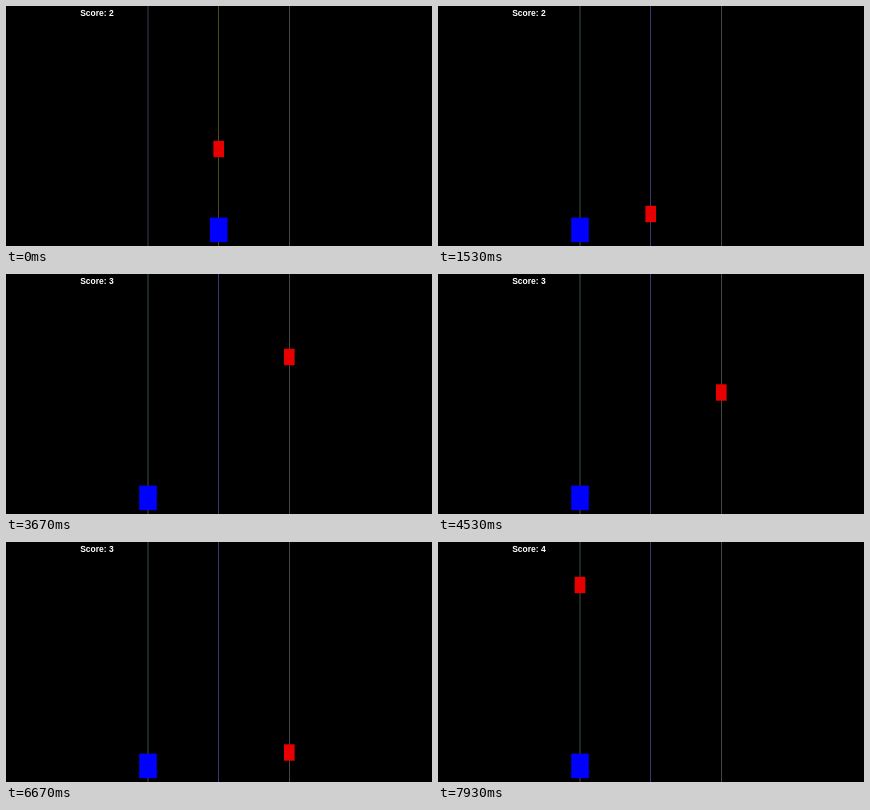
An HTML page for the animation above (8000 ms loop, 426x240 px).

```html
<!DOCTYPE html>
<html lang="en">
<head>
<meta charset="utf-8">
<title>Lane dodge</title>
<style>
  html, body { margin: 0; width: 100%; height: 100%; overflow: hidden; background: #000; }
  svg { display: block; width: 100%; height: 100%; }
  text { font: bold 8.5px "Liberation Sans", Arial, sans-serif; fill: #fff; }
</style>
</head>
<body>
<svg id="stage" viewBox="0 0 426 240">
  <rect width="426" height="240" fill="#000"/>
  <text id="score" x="74.2" y="10"></text>
</svg>
<script>
const LOOP = 8000, FPS = 15;
const LANES = [142, 212.7, 283.3];
const SWITCH = 6; // step at which the player changes lane
const CAR = { w: 17.6, h: 24.6 }, BLOCK = { w: 10.6, h: 16.4 };

// Obstacles: lane and [step, top] waypoints from entry to exit
const obstacles = [
  { lane: 1, path: [[0, 135], [23, 200], [38, 242]] },
  { lane: 2, path: [[25, -8], [42, 39.5], [68, 110.5], [85, 161], [100, 202.5], [114, 242]] },
  { lane: 0, path: [[104, -7], [119, 35]] }
];

const stage = document.getElementById("stage");
const score = document.getElementById("score");

function rect(w, h, fill) {
  const el = document.createElementNS("http://www.w3.org/2000/svg", "rect");
  el.setAttribute("width", w);
  el.setAttribute("height", h);
  el.setAttribute("fill", fill);
  return stage.appendChild(el);
}

function place(el, x, y) {
  el.setAttribute("x", x);
  el.setAttribute("y", y);
}

// The first lane line straddles two pixels, so it is wider and dimmer
const lines = LANES.map((x, i) => {
  const el = rect(i ? 1 : 2, 240, "#444844");
  place(el, i ? Math.floor(x) : x - 1, 0);
  return el;
});
for (const o of obstacles) o.el = rect(BLOCK.w, BLOCK.h, "#e60000");
const player = rect(CAR.w, CAR.h, "#00f");

function topAt(path, n) {
  for (let i = 1; i < path.length; i++) {
    const [a, ya] = path[i - 1], [b, yb] = path[i];
    if (n >= a && n <= b) return ya + (yb - ya) * (n - a) / (b - a);
  }
  return null;
}

function draw(ms) {
  const n = Math.floor((ms % LOOP) * FPS / 1000 + 0.1);
  const moved = n >= SWITCH;

  place(player, LANES[moved ? 0 : 1] - CAR.w / 2, 211.6);
  lines[0].setAttribute("fill", moved ? "#1e281e" : "#1e1e2a");
  lines[1].setAttribute("fill", moved ? "#36366c" : "#4a4a1c");

  for (const o of obstacles) {
    const y = topAt(o.path, n);
    o.el.setAttribute("visibility", y === null ? "hidden" : "visible");
    if (y !== null) place(o.el, LANES[o.lane] - BLOCK.w / 2, y - 0.2);
  }
  score.textContent = "Score: " + (2 + (n >= 38) + (n >= 114));
}

const start = performance.now();
function tick() {
  draw(performance.now() - start);
  requestAnimationFrame(tick);
}
draw(0);
requestAnimationFrame(tick);
</script>
</body>
</html>
```
